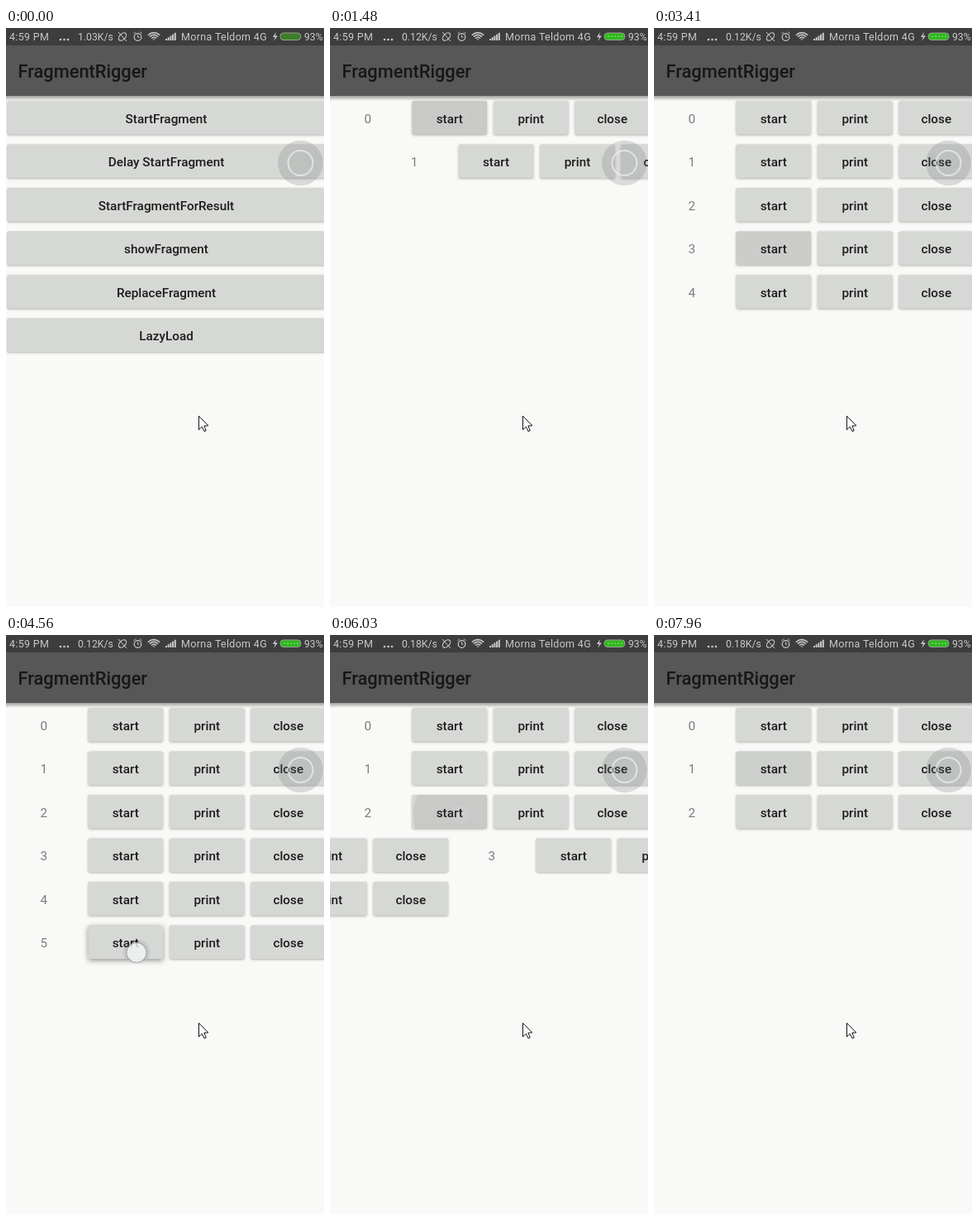
Write an HTML page with a canvas that moves like this. It is 385 by 699 pixels and loops after 8 s.

```html
<!DOCTYPE html>
<html lang="en">
<head>
<meta charset="utf-8">
<title>FragmentRigger</title>
<style>
  html, body { margin: 0; width: 100%; height: 100%; overflow: hidden; background: #f9f9f7; }
  canvas { display: block; width: 385px; height: 699px; }
</style>
</head>
<body>
<canvas></canvas>
<script>
const LOOP = 8000, SLIDE = 300, HOLD = 60;
const LEFT = -3, TOP = 88, WIDTH = 394, COL = WIDTH / 4, PITCH = 52.5;
const INK = '#c9c9c9';
const MENU = ['StartFragment', 'Delay StartFragment', 'StartFragmentForResult',
  'showFragment', 'ReplaceFragment', 'LazyLoad'];

// The finger walks from the menu (-1) down to row 5, then from row 3 up to 0 and back to 1.
const taps = [395, 1255, 1890, 2570, 3105, 3875, 4575, 5190, 5858, 6433, 7053, 7620]
  .map((release, i) => {
    const row = i < 7 ? i - 1 : Math.abs(10 - i);
    return { row, release, down: release - HOLD, x: 158, y: 106 + Math.max(row, 0) * 55.5 };
  });

// Each tap opens the next row and closes every row below the tapped one.
const views = [{ row: -1, enter: -Infinity, exit: Infinity }];
for (const { row, release } of taps) {
  for (const v of views)
    if (v.exit === Infinity && (v.row > row || v.row < 0)) v.exit = release;
  views.push({ row: row + 1, enter: release, exit: Infinity });
}

const canvas = document.querySelector('canvas'), ctx = canvas.getContext('2d');
const dpr = window.devicePixelRatio || 1;
canvas.width = 385 * dpr;
canvas.height = 699 * dpr;

const clamp = v => Math.min(1, Math.max(0, v));
const ease = v => (1 - Math.cos(Math.PI * clamp(v))) / 2;

function text(s, x, y, size, color, weight = 400, align = 'left') {
  ctx.font = `${weight} ${size}px Roboto, sans-serif`;
  ctx.textAlign = align;
  ctx.fillStyle = color;
  ctx.fillText(s, x, y);
}

function path(build, { fill, stroke, width = 1 }) {
  ctx.beginPath();
  build(ctx);
  if (fill) { ctx.fillStyle = fill; ctx.fill(); }
  if (stroke) { ctx.strokeStyle = stroke; ctx.lineWidth = width; ctx.stroke(); }
}

const circle = (x, y, r, style) => path(c => c.arc(x, y, r, 0, 2 * Math.PI), style);
const svg = (d, { fill, stroke }) => {
  const shape = new Path2D(d);
  if (fill) { ctx.fillStyle = fill; ctx.fill(shape); }
  if (stroke) { ctx.strokeStyle = stroke; ctx.lineWidth = 1; ctx.stroke(shape); }
};

function button(label, x, row, width, tap, t) {
  const y = TOP + row * PITCH, h = 40.5;
  const since = tap ? t - tap.release : Infinity;
  const lift = 1 - clamp(since / 60);
  const ripple = 1 - clamp((since - 250) / 250);
  const shape = c => c.roundRect(x, y, width, h, 2);
  ctx.save();
  ctx.shadowColor = `rgba(0,0,0,${0.3 + 0.12 * lift})`;
  ctx.shadowBlur = (3 + 3 * lift) * dpr;
  ctx.shadowOffsetY = (1 + lift) * dpr;
  path(shape, { fill: '#d6d8d5' });
  ctx.restore();
  if (ripple) {
    ctx.save();
    ctx.beginPath();
    shape(ctx);
    ctx.clip();
    circle(tap.x, tap.y, 6 + (since + HOLD) * 0.22, { fill: `rgba(20,0,25,${0.065 * ripple})` });
    ctx.restore();
  }
  text(label, x + width / 2, y + 26.5, 15.3, '#1c1d1c', 500, 'center');
}

function drawView(v, t) {
  const offset = WIDTH * (1 - ease((t - v.enter) / SLIDE) - ease((t - v.exit) / SLIDE));
  if (t < v.enter || Math.abs(offset) >= WIDTH) return;
  const x = LEFT + offset;
  const tap = taps.findLast(p => p.row === v.row && p.down <= t && p.down > v.enter);
  if (v.row < 0) {
    MENU.forEach((s, i) => button(s, x + 4.4, i, WIDTH - 8.8, i ? null : tap, t));
    return;
  }
  text(v.row, x + COL / 2 - 0.4, TOP + 26.5 + v.row * PITCH, 15.3, '#7b7c7b', 400, 'center');
  ['start', 'print', 'close'].forEach((s, i) =>
    button(s, x + COL * (i + 1) + 4, v.row, COL - 8, i ? null : tap, t));
}

function drawTouch({ down, release, x, y }, t) {
  if (t < down) return;
  ctx.globalAlpha = Math.exp(-Math.max(0, t - release) / 65);
  circle(x, y, 12, { fill: 'rgba(245,247,248,.8)', stroke: 'rgba(130,135,140,.5)', width: 1.5 });
  ctx.globalAlpha = 1;
}

function drawStatus(t) {
  const line = { stroke: INK, width: 1.2 }, solid = { fill: INK };
  const speed = t < 1160 ? '1.03' : t < 5180 ? '0.12' : '0.18';
  ctx.fillStyle = '#3d3d3d';
  ctx.fillRect(0, 0, 385, 21);
  ctx.letterSpacing = '0.3px';
  text('4:59 PM', 4, 15, 12.5, INK);
  text('Morna Teldom', 212, 15, 12.5, INK);
  text('4G', 316, 15, 12.5, INK, 400, 'right');
  ctx.letterSpacing = '0px';
  text(speed + 'K/s', 87, 15, 12.2, INK);
  text('93%', 361, 15, 12.2, INK);
  for (let i = 0; i < 3; i++) circle(66 + 4.5 * i, 14, 1.3, solid);

  // silent mode
  path(c => c.ellipse(141, 10.5, 5.5, 3.5, -0.8, 0, 2 * Math.PI), line);
  svg('M136 5l10 11', line);
  // alarm clock
  circle(159.5, 11, 4.3, line);
  svg('M159.5 8.5v2.7h2M154.5 7l2.5-2.5M162 4.5l2.5 2.5', line);
  // wifi and signal
  for (let r = 1; r < 10; r += 2.8)
    path(c => c.arc(179, 15, r, -Math.PI * 0.77, -Math.PI * 0.23), { stroke: INK, width: 1.6 });
  ctx.fillStyle = INK;
  for (let i = 0; i < 5; i++) ctx.fillRect(193 + i * 2.7, 13 - i * 1.8, 2, 2 + i * 1.8);
  // charging battery
  svg('M327 5l-4 6h3l-2 5 5-6.5h-3z', solid);
  const bright = t >= 1160;
  path(c => c.roundRect(332, 6, 25, 8.5, 4),
    { fill: bright ? '#30b820' : '#3c7c27', stroke: '#98a092' });
  if (bright) for (let x = 337; x < 354; x += 4) circle(x, 10.2, 0.9, { fill: '#83df70' });
}

function drawChrome(t) {
  const shadow = ctx.createLinearGradient(0, 82, 0, 88);
  shadow.addColorStop(0, 'rgba(0,0,0,.36)');
  shadow.addColorStop(1, 'rgba(0,0,0,0)');
  ctx.fillStyle = shadow;
  ctx.fillRect(0, 82, 385, 6);
  ctx.fillStyle = '#575757';
  ctx.fillRect(0, 21, 385, 61);
  text('FragmentRigger', 14.5, 60, 21.8, '#171717', 500);
  drawStatus(t);
}

function drawOverlay() {
  circle(356.5, 163, 27.3, { fill: 'rgba(105,108,112,.22)' });
  circle(356.5, 163, 15, { stroke: 'rgba(245,247,247,.65)', width: 2 });
  svg('M233.5 468.5v16.5l3.8-3.6 2.7 5.6 2.3-1-2.5-5.6 5-.4z', { fill: '#fff', stroke: '#111' });
}

function frame(now) {
  const t = now % LOOP;
  ctx.setTransform(dpr, 0, 0, dpr, 0, 0);
  ctx.fillStyle = '#f9f9f7';
  ctx.fillRect(0, 0, 385, 699);
  for (const v of views) drawView(v, t);
  for (const tap of taps) drawTouch(tap, t);
  drawChrome(t);
  drawOverlay();
  requestAnimationFrame(frame);
}
requestAnimationFrame(frame);
</script>
</body>
</html>
```
